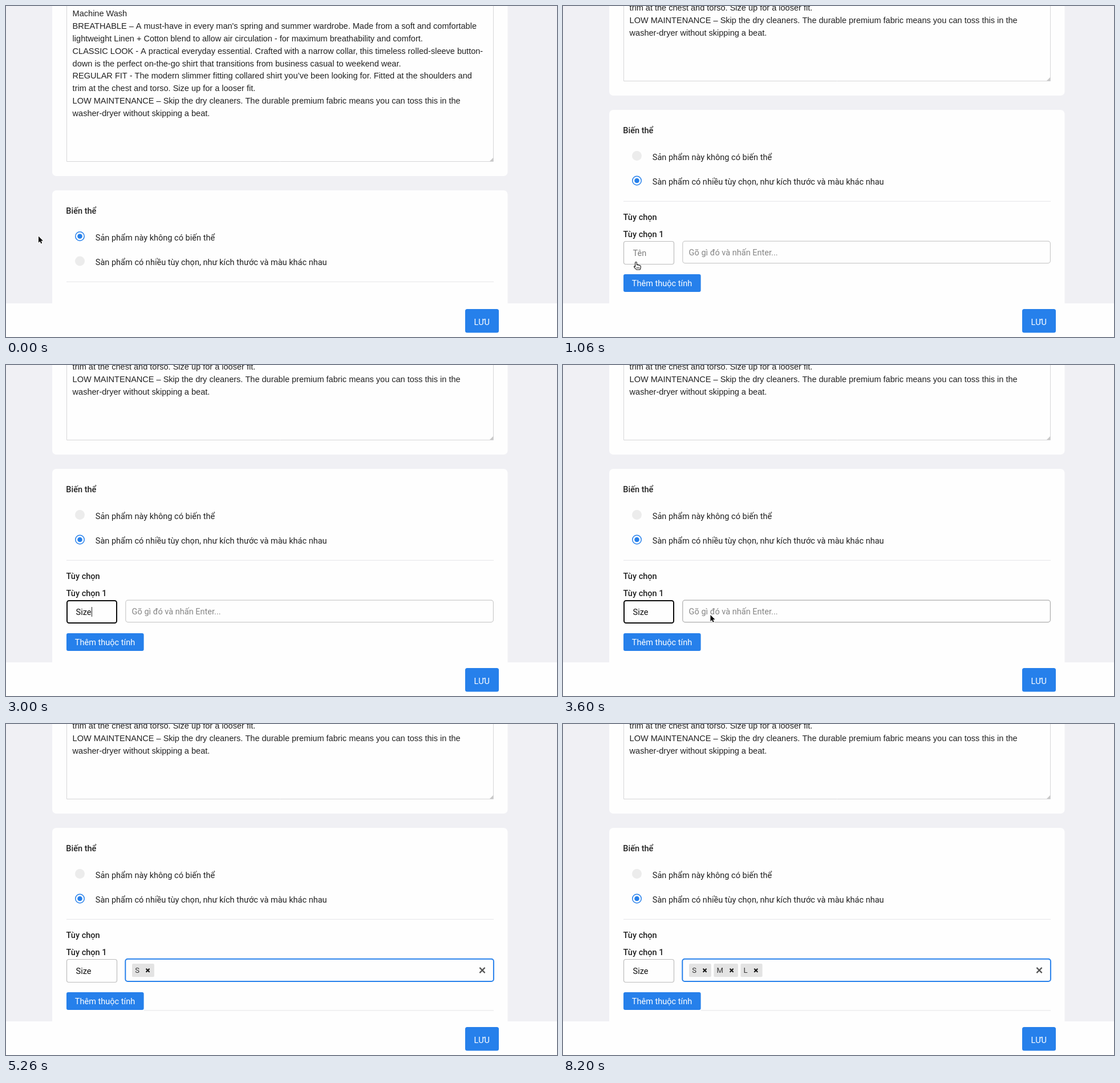
Recreate the animation shown at these times as an HTML page with a canvas. Size 966 by 580 pixels, loop 8330 ms.

```html
<!DOCTYPE html>
<html lang="vi">
<head>
<meta charset="utf-8">
<title>Biến thể</title>
<style>
  html, body { margin: 0; width: 100%; height: 100%; overflow: hidden; background: #f0f0f4; }
  canvas { display: block; }
</style>
</head>
<body>
<canvas id="stage" width="966" height="580"></canvas>
<script>
const ctx = document.getElementById('stage').getContext('2d');
const LOOP = 8330, TICK = 1000 / 15, SCROLL = 141;
const BLUE = '#2680eb', INK = '#212121', CARD = '#fefefe', RULE = '#ebebed';
const SIZE = 14.54;
const ROBOTO = `${SIZE}px Roboto, sans-serif`;
const MEDIUM = `500 ${SIZE}px Roboto, sans-serif`;
const SMALL = '13.1px Roboto, sans-serif';
const ARIAL = `${SIZE}px "Liberation Sans", Arial, sans-serif`;

const DESCRIPTION = [
  'Machine Wash',
  'BREATHABLE – A must-have in every man\'s spring and summer wardrobe. Made from a soft and comfortable',
  'lightweight Linen + Cotton blend to allow air circulation - for maximum breathability and comfort.',
  'CLASSIC LOOK - A practical everyday essential. Crafted with a narrow collar, this timeless rolled-sleeve button-',
  'down is the perfect on-the-go shirt that transitions from business casual to weekend wear.',
  'REGULAR FIT - The modern slimmer fitting collared shirt you’ve been looking for. Fitted at the shoulders and',
  'trim at the chest and torso. Size up for a looser fit.',
  'LOW MAINTENANCE – Skip the dry cleaners. The durable premium fabric means you can toss this in the',
  'washer-dryer without skipping a beat.'
];

// Event times in ms
const PRESS = 1000, EXPAND = 1060, FOCUS_NAME = 1860, FOCUS_TAGS = 3730;
const NAME_KEYS = [2460, 2600, 2660, 2860];
const TAGS = [
  { label: 'S', typed: 4730, added: 5060 },
  { label: 'M', typed: 5530, added: 5860 },
  { label: 'L', typed: 6200, added: 6460 }
];
const CARET_OFF = [
  [2130, 2400], [3060, 3330], [3600, 3730], [4000, 4200], [4400, 4660],
  [4930, 5060], [5260, 5530], [5730, 5860], [6060, 6200], [6660, 6930],
  [7200, 7400], [7660, 7930], [8200, LOOP]
];
const MOVES = [
  { from: 540, to: 935, a: [57, 403.5], b: [128.2, 449] },
  { from: 1670, to: 2000, a: [128.2, 449], b: [135.5, 431] },
  { from: 3000, to: 3595, a: [135.5, 431], b: [258.5, 438] },
  { from: 3680, to: 4000, a: [258.5, 438], b: [259, 439.5] }
];
const CURSOR_HIDDEN = [[2400, 3060], [4660, LOOP]];

const ARROW = new Path2D('M0 0V11.2L2.6 8.8L4.3 12.8L6.2 12L4.5 8.1H8Z');
const HAND = new Path2D('M-1.6 8V1Q-1.6-.5-.2-.5Q1.2-.5 1.2 1V4.6Q2.4 3.9 3.5 5Q4.8 4.5 5.8 5.7Q7.8 5.4 8 7V9.5L6.8 13H.5L-3.3 8.8Q-4.2 7-2.9 6.7Q-2.2 6.8-1.6 8Z');
const BEAM = new Path2D('M-2.6-6.8Q0-6.8 0-5V5Q0 6.8-2.6 6.8M2.6-6.8Q0-6.8 0-5M0 5Q0 6.8 2.6 6.8M-1.5 2H1.5');

const within = (t, spans) => spans.some(([a, b]) => t >= a && t < b);

function text(str, x, y, font = ROBOTO, color = INK) {
  ctx.font = font;
  ctx.fillStyle = color;
  ctx.fillText(str, x, y);
}

function widthOf(str, font) {
  ctx.font = font;
  return ctx.measureText(str).width;
}

function box(x, y, w, h, r, fill, stroke, line = 1) {
  ctx.beginPath();
  ctx.roundRect(x, y, w, h, r);
  if (fill) { ctx.fillStyle = fill; ctx.fill(); }
  if (stroke) { ctx.strokeStyle = stroke; ctx.lineWidth = line; ctx.stroke(); }
}

function rect(x, y, w, h, color) {
  ctx.fillStyle = color;
  ctx.fillRect(x, y, w, h);
}

function disc(x, y, r, color) {
  ctx.fillStyle = color;
  ctx.beginPath();
  ctx.arc(x, y, r, 0, 7);
  ctx.fill();
}

function cross(x, y, r, color, line) {
  ctx.strokeStyle = color;
  ctx.lineWidth = line;
  ctx.beginPath();
  ctx.moveTo(x - r, y - r);
  ctx.lineTo(x + r, y + r);
  ctx.moveTo(x + r, y - r);
  ctx.lineTo(x - r, y + r);
  ctx.stroke();
}

function radio(y, state) {
  const x = 129.5;
  disc(x, y, 8.5, state === 'off' ? '#ececec' : BLUE);
  if (state === 'on') {
    disc(x, y, 7, CARD);
    disc(x, y, 4.3, BLUE);
  }
}

function drawPage(t) {
  const open = t >= EXPAND;
  ctx.save();
  if (open) ctx.translate(0, -SCROLL);

  box(81, -40, 798.5, 338, 7, CARD);
  box(106.5, -30, 748, 302.5, 0, null, '#d6d6d8');
  ctx.fillStyle = '#c8c8c8';
  ctx.beginPath();
  ctx.moveTo(854, 266);
  ctx.lineTo(854, 272);
  ctx.lineTo(848, 272);
  ctx.fill();
  DESCRIPTION.forEach((line, i) => text(line, 116.6, 18.3 + i * 21.81, ARIAL));

  box(81, 323, 798.5, 500, 7, CARD);
  text('Biến thể', 105.3, 363.7, MEDIUM);
  radio(403.5, open ? 'off' : 'on');
  radio(447, open ? 'on' : t >= PRESS ? 'pressed' : 'off');
  text('Sản phẩm này không có biến thể', 156.8, 410.6);
  text('Sàn phẩm có nhiều tùy chọn, như kích thước và màu khác nhau', 156.8, 454.3);
  rect(106, 482.6, 749, 1.4, RULE);
  ctx.restore();
}

function caret(t, x) {
  if (!within(t, CARET_OFF)) rect(Math.round(x), 424, 1, 17, '#222');
}

function drawName(t) {
  const focused = t >= FOCUS_NAME && t < FOCUS_TAGS;
  if (focused) box(107, 413, 87, 39, 3.5, CARD, '#0c0c0c', 2);
  else box(106.5, 412.5, 88, 40, 3.5, CARD, '#bdbdbd', 1.2);
  const value = 'Size'.slice(0, NAME_KEYS.filter(k => t >= k).length);
  if (value) text(value, 122.6, 437.8, ROBOTO, '#111');
  else text('Tên', 122.6, 437.8, ROBOTO, '#7c7c7c');
  if (focused) caret(t, 122.6 + widthOf(value, ROBOTO));
}

function drawTags(t, hover) {
  const focused = t >= FOCUS_TAGS;
  if (focused) box(209.3, 411.8, 645.6, 39.2, 4, CARD, BLUE, 2);
  else box(209.8, 412.2, 644.6, 38.4, 4, CARD, hover ? '#adadad' : '#cbcbcb', 1.2);

  if (t < TAGS[0].typed) text('Gõ gì đó và nhấn Enter...', 220.6, 436.5, ROBOTO, '#858585');
  let x = 221;
  for (const { label, typed, added } of TAGS) {
    if (t >= added) {
      const w = widthOf(label, SMALL) + 31.1;
      box(x, 420, w, 23.3, 2, '#e3e3e3');
      text(label, x + 5.2, 436, SMALL, '#333');
      cross(x + w - 11.3, 431.7, 3, '#111', 2);
      x += w + 4.5;
    } else if (t >= typed) {
      text(label, x, 437.6, ROBOTO, '#222');
      x += widthOf(label, ROBOTO);
    }
  }
  if (focused) caret(t, x);
  if (t >= TAGS[0].added) {
    cross(835, 431.5, 4.6, '#555', 2.2);
    rect(242, 501.3, 613, 1.3, RULE);
  }
}

function drawOptions(t, hover) {
  text('Tùy chọn', 105.5, 375.4, MEDIUM);
  text('Tùy chọn 1', 105.5, 405.4, MEDIUM);
  drawName(t);
  drawTags(t, hover);
  box(106, 470, 135.6, 31, 3, BLUE);
  text('Thêm thuộc tính', 120.8, 490.6, ROBOTO, '#fff');
}

function pointerAt(t) {
  const now = Math.floor((t + 7) / TICK) * TICK;
  let [x, y] = MOVES[0].a;
  for (const { from, to, a, b } of MOVES) {
    if (now < from) break;
    const p = Math.min(1, (now - from) / (to - from));
    const e = p * p * (3 - 2 * p);
    x = a[0] + (b[0] - a[0]) * e;
    y = a[1] + (b[1] - a[1]) * e;
  }
  return { x, y };
}

function pointerKind(t, { x, y }) {
  if (t < 1730) return x > 118 && y > 437 ? 'hand' : 'arrow';
  return x < 195 && y < 453 ? 'beam' : 'arrow';
}

function drawPointer(t, at) {
  if (within(t, CURSOR_HIDDEN)) return;
  const kind = pointerKind(t, at);
  ctx.save();
  ctx.translate(at.x, at.y);
  ctx.lineJoin = 'round';
  if (kind === 'beam') {
    ctx.strokeStyle = '#fff';
    ctx.lineWidth = 2.6;
    ctx.stroke(BEAM);
    ctx.strokeStyle = '#111';
    ctx.lineWidth = 1.2;
    ctx.stroke(BEAM);
  } else if (kind === 'hand') {
    ctx.fillStyle = '#fff';
    ctx.fill(HAND);
    ctx.strokeStyle = '#111';
    ctx.lineWidth = 1.1;
    ctx.stroke(HAND);
    ctx.lineWidth = 0.8;
    ctx.stroke(new Path2D('M1.3 8.5V11M3.2 8.5V11M5.1 8.5V11'));
  } else {
    ctx.strokeStyle = '#fff';
    ctx.lineWidth = 2;
    ctx.stroke(ARROW);
    ctx.fillStyle = '#0a0a0a';
    ctx.fill(ARROW);
  }
  ctx.restore();
}

function drawFooter() {
  rect(0, 521, 966, 59, CARD);
  box(805, 531, 59, 41.5, 3.5, BLUE);
  text('LƯU', 820.5, 559, ROBOTO, '#fff');
}

function draw(t) {
  const at = pointerAt(t);
  rect(0, 0, 966, 580, '#f0f0f4');
  drawPage(t);
  if (t >= EXPAND) drawOptions(t, at.x > 209);
  drawFooter();
  drawPointer(t, at);
}

const start = performance.now();
function loop() {
  draw((performance.now() - start) % LOOP);
  requestAnimationFrame(loop);
}
loop();
</script>
</body>
</html>
```
